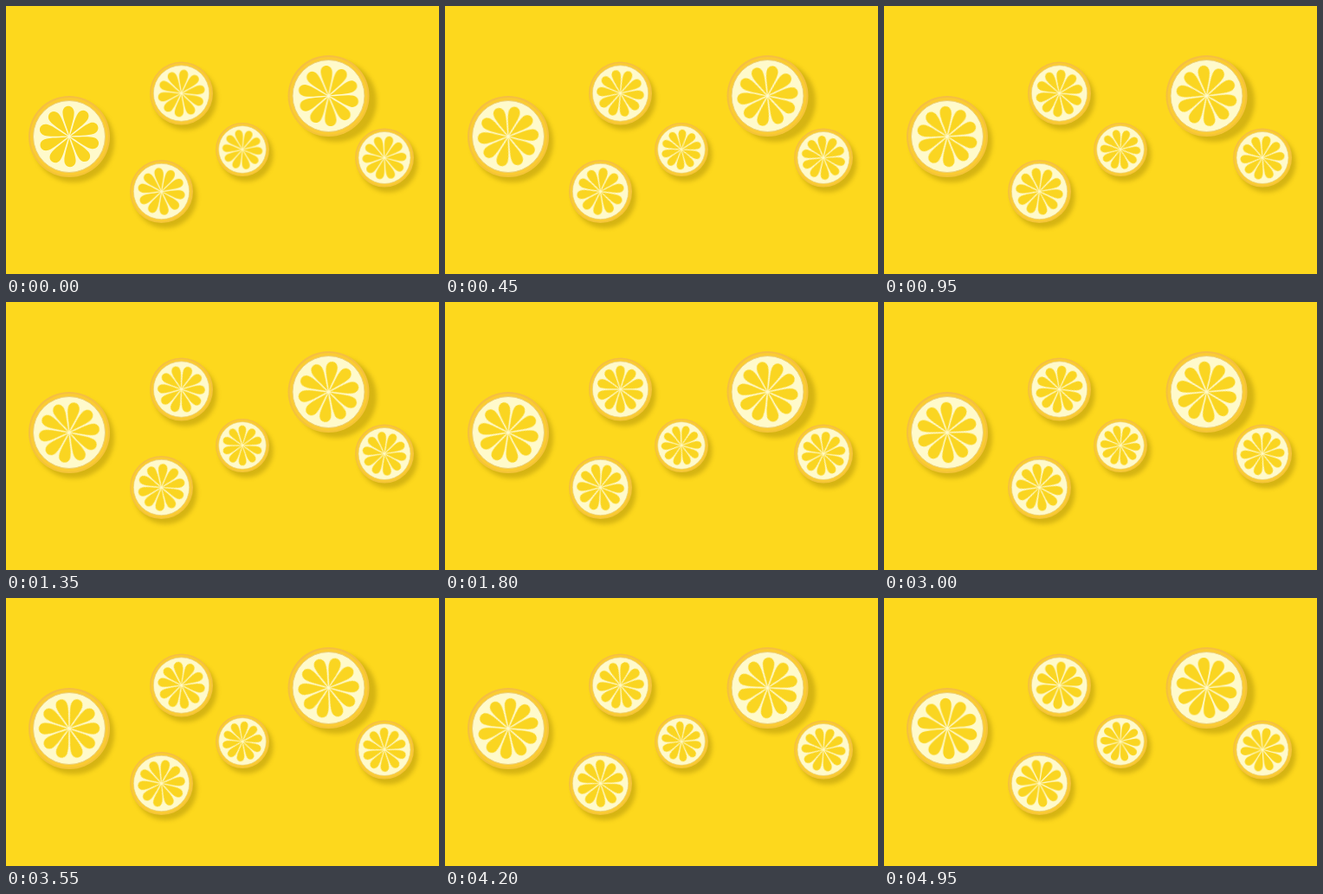
Recreate the animation shown at these times as an HTML page. Size 500x310 px, loop 5000 ms.

```html
<!DOCTYPE html>
<html lang="en">
<head>
<meta charset="utf-8">
<title>Lemon slices</title>
<style>
  html, body { margin: 0; width: 100%; height: 100%; overflow: hidden; background: #fdd81d; }
  svg { display: block; width: 500px; height: 310px; }
  .spin { transform-box: view-box; transform-origin: 0 0; }
</style>
</head>
<body>
<svg id="stage" viewBox="0 0 500 310">
  <defs>
    <filter id="blur" x="-30%" y="-30%" width="160%" height="160%">
      <feGaussianBlur stdDeviation="2.6"/>
    </filter>
    <linearGradient id="rind" x1="0" y1="0" x2="0.25" y2="1">
      <stop offset="0" stop-color="#f5bd45"/>
      <stop offset="1" stop-color="#f4c437"/>
    </linearGradient>
  </defs>
</svg>
<script>
const NS = 'http://www.w3.org/2000/svg';
const LOOP = 5000;
const FRAMES = 100;
const PETALS = 10;
const PETAL = 'M0-1.5C-1.5-9-6.8-21-6.6-28C-6.3-37.6 6.3-37.6 6.6-28C6.8-21 1.5-9 0-1.5Z';

// x, y, radius, starting angle, shadow offset
const slices = [
  [73, 151, 47, -2, 5],
  [202.5, 101, 36.5, 7, 4.5],
  [179.5, 214.5, 36.5, -8, 4.5],
  [273, 166, 31, 23, 4.5],
  [372.5, 104, 47, -5, 8.5],
  [437, 175.5, 34, 15, 4.5]
];

function add(parent, tag, attrs) {
  const el = document.createElementNS(NS, tag);
  for (const key in attrs) el.setAttribute(key, attrs[key]);
  return parent.appendChild(el);
}

function addSlice([x, y, r, start, shift]) {
  const stage = document.getElementById('stage');
  add(stage, 'circle', {
    cx: x + shift, cy: y + 6, r, fill: '#8a7000', opacity: 0.34, filter: 'url(#blur)'
  });
  const body = add(stage, 'g', { transform: `translate(${x} ${y}) scale(${r / 47})` });
  add(body, 'circle', { r: 47, fill: 'url(#rind)' });
  add(body, 'circle', { r: 45, fill: '#fbcb33' });
  add(body, 'circle', { r: 41.5, fill: '#fffacb', stroke: '#ecd07a', 'stroke-width': 1 });
  const spin = add(body, 'g', { class: 'spin' });
  for (let i = 0; i < PETALS; i++) {
    add(spin, 'path', {
      d: PETAL, fill: '#fad521', transform: `rotate(${start + i * 360 / PETALS})`
    });
  }
  // Half a turn brings the petals back onto themselves.
  spin.animate(
    [{ transform: 'rotate(0deg)' }, { transform: 'rotate(180deg)' }],
    { duration: LOOP, iterations: Infinity, easing: `steps(${FRAMES}, end)` }
  );
}

slices.forEach(addSlice);
</script>
</body>
</html>
```
